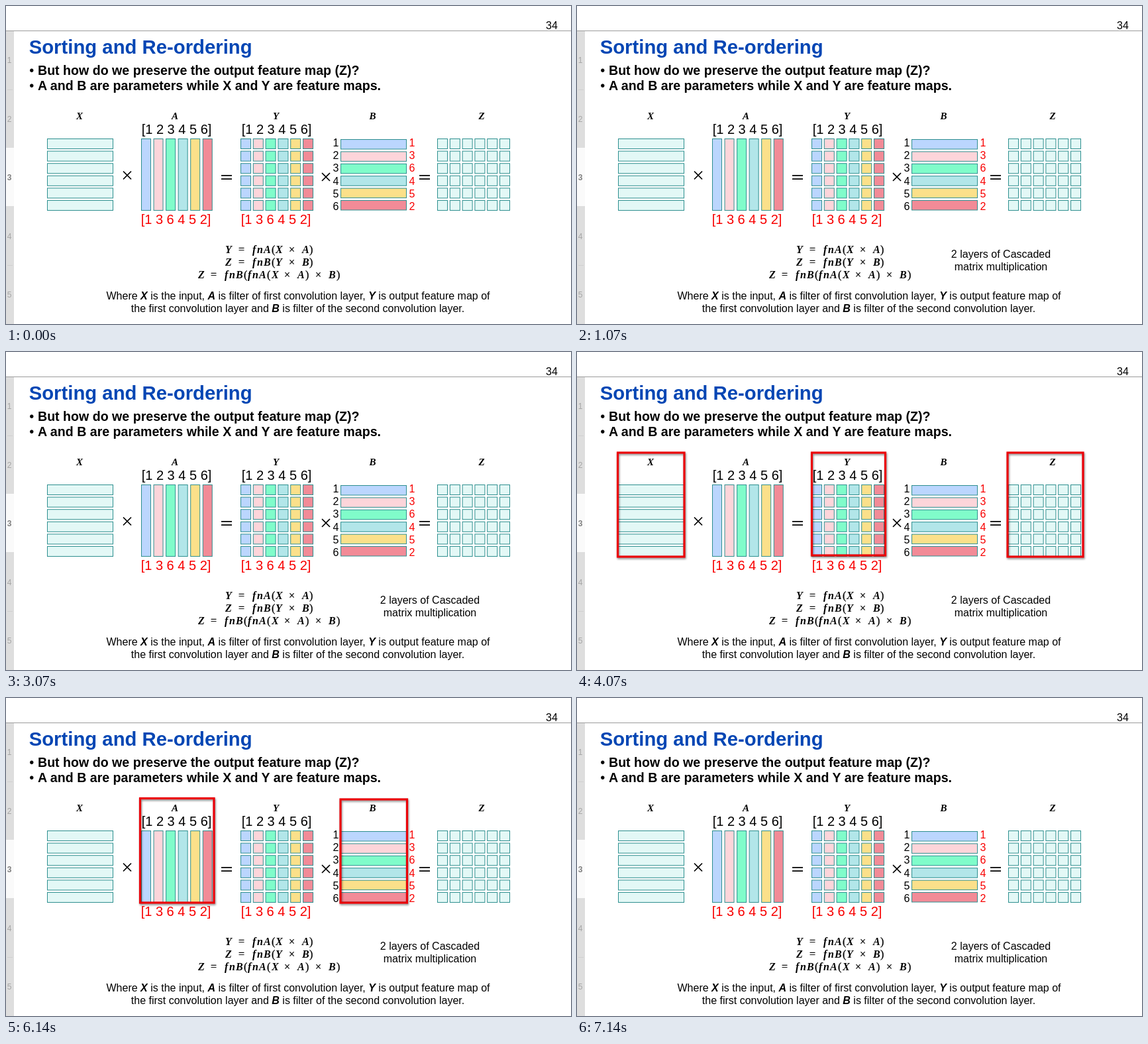
Recreate the animation shown at these times as an HTML page. Size 853 px wide and 480 px high, loop 8 s.

```html
<!DOCTYPE html>
<html lang="en">
<head>
<meta charset="utf-8">
<title>Sorting and Re-ordering</title>
<style>
  html, body { margin: 0; width: 100%; height: 100%; overflow: hidden; background: #fff; }
  svg { display: block; width: 100%; height: 100%; }
  text { font: 16px "Liberation Sans", Arial, sans-serif; fill: #000; }
  .title { font-size: 29.3px; font-weight: bold; fill: #0446b4; }
  .bullet { font-size: 19.6px; font-weight: bold; }
  .order { font-size: 20px; }
  .red { fill: #f80000; }
  .mid { text-anchor: middle; }
  .page { font-size: 12px; fill: #a6a6a6; }
  .current { font-weight: bold; fill: #808080; }
  .symbol { font: italic bold 16px "Liberation Serif", "Times New Roman", serif; }
  .sign { font: 16px "Liberation Serif", "Times New Roman", serif; stroke: #000; stroke-width: .3px; }
  .label { font-size: 15px; }
  .var { font-weight: bold; font-style: italic; }
  .cell { stroke: #2e8f8f; stroke-width: 1; }
  .operator { stroke: #000; stroke-width: 1.7; fill: none; }
  .frame { fill: none; stroke: #eb0008; stroke-width: 3.2; filter: drop-shadow(1px 2px 1.5px rgba(0, 0, 0, .45)); }
</style>
</head>
<body>
<svg id="stage" viewBox="0 0 853 480"></svg>
<script>
const stage = document.getElementById('stage');
const LOOP = 8000;
const PALE = '#e3f8f6';
const COLORS = ['#bbd6fe', '#fdd5da', '#80fcca', '#b2e6e9', '#fbe08a', '#f28b97'];
const ORDER = [1, 3, 6, 4, 5, 2];
const SIX = [0, 1, 2, 3, 4, 5];
const timed = [];

function add(tag, attributes, content = '') {
  const node = document.createElementNS('http://www.w3.org/2000/svg', tag);
  for (const [name, value] of Object.entries(attributes)) node.setAttribute(name, value);
  node.innerHTML = content;
  return stage.appendChild(node);
}
const write = (x, y, content, style = '') => add('text', { x, y, class: style }, content);
const box = (x, y, width, height, fill, style = 'cell') =>
  add('rect', { x, y, width, height, fill, class: style });
const showDuring = (node, start, end) => timed.push({ node, start, end });

function drawSidebar() {
  box(0, 38, 12, 442, '#dedede', '');
  box(0, 214, 12, 88, '#fafafa', '');
  for (const y of [126, 391]) box(2, y, 8, 1, '#d0d0d0', '');
  SIX.slice(0, 5).forEach(i =>
    write(5, 86 + i * 88.5, i + 1, 'mid page' + (i === 2 ? ' current' : '')));
  box(0, 37, 853, 1, '#9c9c9c', '');
}

function drawHeadings() {
  write(824, 35, '34', 'mid');
  write(34.7, 72, 'Sorting and Re-ordering', 'title');
  const lines = [
    'But how do we preserve the output feature map (Z)?',
    'A and B are parameters while X and Y are feature maps.'
  ];
  lines.forEach((line, i) => {
    write(35.3, 104 + i * 23, '•', 'order');
    write(48, 104 + i * 23, line, 'bullet');
  });
}

function drawGrid(left, colorOf) {
  for (const row of SIX) for (const column of SIX)
    box(left + column * 18.8, 200.5 + row * 18.6, 15, 15, colorOf(column));
}

function drawMatrices() {
  for (const i of SIX) {
    const y = 200.5 + i * 18.6;
    box(62.5, y, 99, 15, PALE);
    box(204.5 + i * 18.55, 200.5, 14, 108, COLORS[i]);
    box(505.5, 201.5 + i * 18.4, 99, 14.5, COLORS[i]);
    write(498, 212 + i * 19.2, i + 1, 'mid');
    write(613, 212 + i * 19.2, ORDER[i], 'mid red');
  }
  drawGrid(354.5, column => COLORS[column]);
  drawGrid(651.5, () => PALE);
  for (const x of [204.7, 355.7]) {
    write(x, 193, '[1 2 3 4 5 6]', 'order');
    write(x - 1, 329, `[${ORDER.join(' ')}]`, 'order red');
  }
  const labels = { X: 111, A: 255, Y: 407.5, B: 553.5, Z: 718 };
  for (const [name, x] of Object.entries(labels)) write(x, 171, name, 'symbol label mid');
  const times = (x, y) => add('path', { class: 'operator', d: `M${x - 6} ${y - 6}l12 12m0-12l-12 12` });
  const equals = (x, y) => add('path', { class: 'operator', d: `M${x - 8} ${y - 2.7}h16m0 5.4h-16` });
  times(183, 255.5);
  times(483, 258);
  equals(333, 258.5);
  equals(632, 258.5);
}

function drawEquation(y, characters, positions) {
  [...characters].forEach((character, i) =>
    write(positions[i], y, character, /[A-Zfn]/.test(character) ? 'symbol' : 'sign'));
}

function drawNotes() {
  const twoFactors = [331, 351, 372, 379, 389, 401, 407, 427, 447, 458];
  drawEquation(373, 'Y=fnA(X×A)', twoFactors);
  drawEquation(392, 'Z=fnB(Y×B)', twoFactors);
  drawEquation(411, 'Z=fnB(fnA(X×A)×B)',
    [290, 309, 330, 337, 347, 359, 365, 372, 382, 394, 401, 420, 440, 452, 467, 487, 499]);

  const v = name => `<tspan class="var">${name}</tspan>`;
  write(441, 443, `Where ${v('X')} is the input, ${v('A')} is filter of first convolution layer, ` +
    `${v('Y')} is output feature map of`, 'mid');
  write(440.5, 462, `the first convolution layer and ${v('B')} is filter of the second convolution layer.`, 'mid');

  showDuring(write(640, 380, '2 layers of Cascaded', 'mid'), 1070, LOOP);
  showDuring(write(640, 399, 'matrix multiplication', 'mid'), 1070, LOOP);
}

function drawFrames() {
  const frame = (start, end, x, y, width, height) =>
    showDuring(box(x, y, width, height, 'none', 'frame'), start, end);
  frame(2070, 3070, 269, 349, 254.5, 70.5);
  frame(4070, 5070, 61.5, 152, 100.5, 157);
  frame(4070, 5070, 354.5, 152, 111, 155);
  frame(4070, 5070, 650, 152, 114, 157);
  frame(6140, 7140, 202.5, 151.5, 111.5, 157.5);
  frame(6140, 7140, 505, 153, 100.5, 156);
}

drawSidebar();
drawHeadings();
drawMatrices();
drawNotes();
drawFrames();

const startTime = performance.now();
function render() {
  const time = (performance.now() - startTime) % LOOP;
  for (const { node, start, end } of timed)
    node.style.visibility = time >= start && time < end ? 'visible' : 'hidden';
  requestAnimationFrame(render);
}
render();
</script>
</body>
</html>
```
